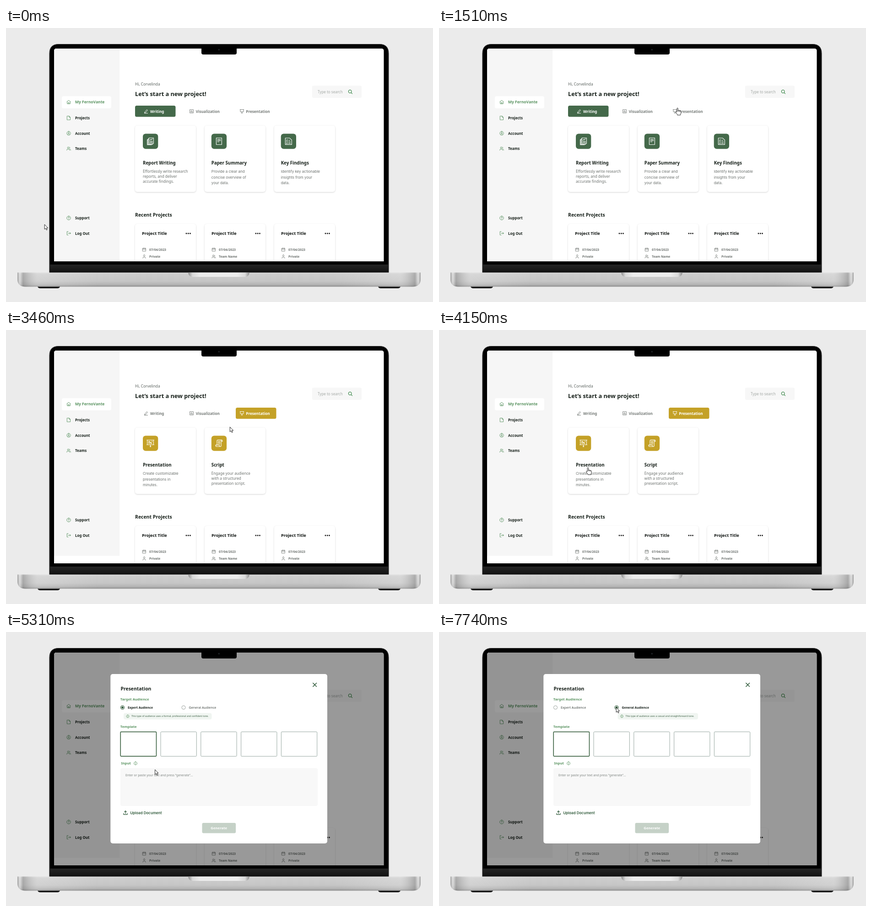
These frames come from a looping animation (933 px wide and 600 px high, 8000 ms). An HTML page:

```html
<!DOCTYPE html>
<html lang="en">
<head>
<meta charset="utf-8">
<title>Project dashboard</title>
<style>
html, body { margin: 0; width: 100%; height: 100%; overflow: hidden; background: #ebebeb; }
svg { display: block; width: 100%; height: 100%; }
text { font-family: "Noto Sans", sans-serif; white-space: pre; }
.b { font-weight: 700; }
.inter { font-family: Inter, sans-serif; }
.m { text-anchor: middle; }
.icon path { fill: none; stroke-linecap: round; stroke-linejoin: round; vector-effect: non-scaling-stroke; }
.card { fill: #fff; filter: drop-shadow(0 1px 1.6px rgba(0, 0, 0, .17)); }
</style>
</head>
<body>
<svg id="stage" viewBox="0 0 933 600" preserveAspectRatio="none"></svg>
<script>
const GREEN = '#44694a', LEAF = '#5b9462', GOLD = '#c4a127', INK = '#17201a', GREY = '#6c716e';

// Icons live in a 10 by 10 box.
const ring = 'M5 .5a4.5 4.5 0 1 0 .01 0z';
const ICONS = {
  home: 'M.8 4.6L5 .9l4.2 3.7M1.5 4v5.2h7V4M4 9V6.2h2V9',
  file: 'M1.5.6H6l2.7 2.7v6.1H1.5zM6 .6v2.7h2.7',
  account: ring + 'M5 2.5a1.6 1.6 0 1 0 .01 0zM2.2 8.3q.5-2 2.8-2t2.8 2',
  people: 'M3.7 1.4a1.8 1.8 0 1 0 .01 0zM.6 9V8q0-1.8 3.1-1.8T6.8 8v1M6.6 1.5a1.8 1.8 0 0 1 0 3.4M7.6 6.4q1.9.3 1.9 2V9',
  help: ring + 'M3.7 4q0-1.4 1.4-1.4T6.4 4Q6.3 4.8 5 5.5V6M5 7.5v.1',
  exit: 'M4 1H1v8h3M3.7 5h5.8M7.5 3l2 2-2 2',
  date: 'M1 2h8v7.4H1zM1 4.5h8M3 .7v2M7 .7v2',
  person: 'M5 .8a2 2 0 1 0 .01 0zM1.6 9.4v-.8q0-2.2 3.4-2.2t3.4 2.2v.8',
  pen: 'M2 6.4L7 .9l1.8 1.8-5 5.4-2.3.6zM1 9.7h8',
  chart: 'M.9.9h8.2v8.2H.9zM3 4.2v3M5 2.8v4.4M7 5.5v1.7',
  board: 'M.3.8h9.4M1.1.8v5.4h7.8V.8M5 6.2v2.6M3.3 9.3h3.4',
  search: 'M4.3.8a3.5 3.5 0 1 0 .01 0zM6.9 6.9l2.5 2.5',
  upload: 'M.8 6.5v2.7h8.4V6.5M5 7V.8M2.6 3.2L5 .8l2.4 2.4',
  info: ring + 'M5 4.6v2.8M5 2.7v.1',
  close: 'M.5.5l9 9M9.5.5l-9 9',
  report: 'M3 .7h6v7.2H3zM3 2H1.9v7h5.9V8M1.9 3H.9v6.6h5.5M4.2 5h3.6M4.2 6.4h3.6M4.2 3.7l1.1-1.2.9.7 1.4-1.4',
  paper: 'M1.5.7h7v8.6h-7zM3 2.7h4M3 4.2h4M3 5.7h2',
  findings: 'M.9.9h5.6l2.6 2.4v5.9H.9zM2.3 3.5l.5.5.9-1M2.3 5.5l.5.5.9-1M2.3 7.5l.5.5.9-1M5 3.8h2M5 5.7h2.5M5 7.6h2.5',
  slides: 'M.3.9h9.4M1 .9v6h8v-6M.3 6.9h9.4M5 6.9v1.8M5 8.7a.5.5 0 1 0 .01 0zM2.8 5.5v-3h1.3v3M4.1 3.7h1.2v1.8M5.3 4.5h1.4v1M6.6 2.4h1',
  script: 'M2.4 7.2V2q0-1.2 1.2-1.2h5Q9.4.8 9.4 2v.6H7.8M7.8 2.6V8q0 1.3-1.2 1.3H1.8Q.7 9.3.7 7.3h4.8v1q0 1 1.1 1M7.8 2.6V1.8q0-1 .8-1M3.8 2.7h2.6M3.8 4.2h2.6M3.8 5.7h2.6'
};

const icon = (name, cx, cy, size, color, width = .9) =>
  `<g class="icon" transform="translate(${cx - size / 2} ${cy - size / 2}) scale(${size / 10})"><path d="${ICONS[name]}" stroke="${color}" stroke-width="${width}"/></g>`;
const text = (s, x, y, size, fill, cls = '') =>
  `<text x="${x}" y="${y}" font-size="${size}" fill="${fill}" class="${cls}">${s}</text>`;
const box = (x, y, w, h, r, fill, more = '') =>
  `<rect x="${x}" y="${y}" width="${w}" height="${h}" rx="${r}" fill="${fill}" ${more}/>`;
const card = (x, y, h) => `<rect class="card" x="${x}" y="${y}" width="133" height="${h}" rx="5"/>`;
const group = (id, body) => `<g id="${id}">${body}</g>`;

const navItem = ([label, name, y]) =>
  icon(name, 137, y, 9.4, LEAF) + text(label, 151, y + 3, 7.95, INK, 'b');

function tabs(active, fill) {
  return [['Writing', 'pen', 282, 306, 315], ['Visualization', 'chart', 392, 405.7, 414.7],
    ['Presentation', 'board', 502, 515.5, 524.3]].map(([label, name, x, ix, tx], i) => {
    const on = i === active, color = on ? '#fff' : '#777c79';
    return (on ? box(x, 170, 88.5, 24.5, 3.5, fill) : '') +
      icon(name, ix, 182.4, 9, color) + text(label, tx, 185.6, 8.15, color, 'b');
  }).join('');
}

// Cards in the wide style are set in Inter with looser lines.
function toolCard(x, tx, fill, name, title, lines, wide) {
  return card(x, 213.5, 145.5) + box(tx, 231.5, 33.3, 33.3, 6, fill) +
    icon(name, tx + 16.6, 248, 17, '#fff', 1.1) + text(title, tx, 299.2, 9.7, INK, 'b') +
    lines.map((s, i) => text(s, tx, wide ? 317 + i * 12.5 : 316.6 + i * 11.3,
      wide ? 8 : 8.13, GREY, wide ? 'inter' : '')).join('');
}

function recentCard(x, i) {
  const team = i === 1;
  return card(x, 429, 110) + text('Project Title', x + 15, 453, 9.14, '#0d120f', 'b') +
    [112, 116.2, 120.4].map(d => `<circle cx="${x + d}" cy="450" r="1.4" fill="#111"/>`).join('') +
    icon('date', x + 20, 485, 8.4, GREY, .8) + text('07/04/2023', x + 31, 488, 6.85, GREY, 'b') +
    icon(team ? 'people' : 'person', x + 20, 500.3, 8.8, GREY, .8) +
    text(team ? 'Team Name' : 'Private', x + 31, 503.4, 6.8, GREY, 'b');
}

const sidebar = [['Projects', 'file', 197], ['Account', 'account', 230.5], ['Teams', 'people', 264],
  ['Support', 'help', 416], ['Log Out', 'exit', 449.5]].map(navItem).join('');

const page = box(105, 45, 721, 466, 0, '#fff') +
  `<rect id="side" x="105" y="45" width="143" height="466" fill="#f6f6f6"/>` +
  box(122, 149.3, 108, 26.7, 4, '#fff') + icon('home', 137, 162, 9.4, LEAF) +
  text('My FernoVante', 151, 165.1, 8.53, LEAF, 'b') + sidebar +
  text('Hi, Corvelinda', 282, 126, 8.34, '#5d6460') +
  text('Let’s start a new project!', 282, 148.5, 12.7, INK, 'b') +
  box(669, 126.3, 108, 26.7, 3, '#f7f7f7') + text('Type to search', 681, 143, 8.04, '#a3a8a5') +
  icon('search', 752.3, 139.7, 9.5, '#3f8a4d', 1.2) +
  group('writing', tabs(0, GREEN) +
    toolCard(282, 299, GREEN, 'report', 'Report Writing', ['Effortlessly write research', 'reports, and deliver', 'accurate findings.']) +
    toolCard(434, 448.8, GREEN, 'paper', 'Paper Summary', ['Provide a clear and', 'concise overview of', 'your data.'], true) +
    toolCard(586, 600.7, GREEN, 'findings', 'Key Findings', ['Identify key actionable', 'insights from your', 'data.'], true)) +
  group('presenting', tabs(2, GOLD) +
    toolCard(282, 299, GOLD, 'slides', 'Presentation', ['Create customizable', 'presentations in', 'minutes.'], true) +
    toolCard(434, 448.8, GOLD, 'script', 'Script', ['Engage your audience', 'with a structured', 'presentation script.'])) +
  text('Recent Projects', 282, 412.7, 10.45, INK, 'b') + [282, 434, 586].map(recentCard).join('');

function radio(x, label, on) {
  const c = (r, more) => `<circle cx="${x}" cy="165.3" r="${r}" ${more}/>`;
  return c(4, `fill="#fff" stroke="${on ? '#2f5a3a' : '#858d88'}" stroke-width="${on ? 1.1 : .8}"`) +
    (on ? c(2.4, 'fill="#2f5a3a"') : '') +
    text(label, x + 11.5, 167.9, on ? 6.75 : 7.22, on ? INK : '#444b47', on ? 'b' : '');
}
const tip = (x, w, s) => box(x, 177.5, w, 14, 4, '#f0f5f1') +
  icon('info', x + 9, 184.5, 6.6, LEAF, .8) + text(s, x + 17, 186.4, 5.22, '#3d6045');
const audience = expert => radio(254.5, 'Expert Audience', expert) + radio(388, 'General Audience', !expert) +
  (expert ? tip(257, 192.5, 'This type of audience uses a formal, professional and confident tone.')
          : tip(390.5, 175.5, 'This type of audience uses a casual and straightforward tone.'));

const templates = [0, 1, 2, 3, 4].map(i => box(250.2 + i * 87.8, 218.6, 78.3, 53.6, 1.6, '#fff',
  i ? 'stroke="#8d9f98" stroke-width=".9"' : `stroke="${GREEN}" stroke-width="1.7"`)).join('');

const modal = box(105, 45, 721, 466, 0, '#000', 'opacity=".4"') + box(228.3, 92, 473.7, 371, 5, '#fff') +
  text('Presentation', 250.6, 128.3, 10.36, INK, 'b') + icon('close', 674.6, 115.7, 8.6, '#2f5a3a', 1.5) +
  text('Target Audience', 249.8, 149.5, 7.75, LEAF, 'b') +
  group('expert', audience(true)) + group('general', audience(false)) +
  text('Template', 249.8, 209.5, 7.7, LEAF, 'b') + templates +
  text('Input', 251.4, 290, 7.75, LEAF, 'b') + icon('info', 283, 287.6, 7.6, LEAF, .9) +
  box(250, 298, 431, 83, 4, '#f8f8f8') +
  text('Enter or paste your text and press “generate”...', 261, 316, 6.72, '#7c827f') +
  icon('upload', 261, 395.6, 9.6, '#2f5a3a', 1.2) +
  `<g font-weight="600">${text('Upload Document', 271.2, 398.5, 8, '#2f5a3a', 'inter')}</g>` +
  box(428.5, 418, 73.6, 22.5, 3, '#c5d1c7') + text('Generate', 465.2, 432.2, 7.75, '#fff', 'b m');

const gradient = (id, dir, stops) => `<linearGradient id="${id}" x1="0" y1="0" x2="${dir === 'x' ? 1 : 0}" y2="${dir === 'x' ? 0 : 1}">` +
  stops.map(([o, c, a = 1]) => `<stop offset="${o}" stop-color="${c}" stop-opacity="${a}"/>`).join('') + '</linearGradient>';

const basePath = 'M25 535.5H906V550Q906 566.5 888 566.5H43Q25 566.5 25 550Z';
const laptop = `<defs>
  ${gradient('chin', 'y', [[0, '#242424'], [.5, '#1b1b1b'], [1, '#101010']])}
  ${gradient('metal', 'y', [[0, '#d9d9d9'], [.12, '#cdcdcd'], [.6, '#c6c6c6'], [.85, '#b4b4b4'], [1, '#8e8e8e']])}
  ${gradient('sheen', 'x', [[0, '#777', .6], [.006, '#fff', .35], [.014, '#777', .4], [.05, '#fff', .2],
    [.2, '#fff', 0], [.8, '#fff', 0], [.95, '#fff', .2], [.986, '#777', .4], [.994, '#fff', .35], [1, '#777', .6]])}
  ${gradient('lip', 'x', [[0, '#8c8c8c'], [.07, '#d9d9d9'], [.2, '#ececec'], [.8, '#ececec'], [.93, '#d9d9d9'], [1, '#8c8c8c']])}
  <clipPath id="screen"><path d="M105 511V50q0-5 5-5H820.5q5 0 5 5V511Z"/></clipPath></defs>
  <rect width="933" height="600" fill="#ebebeb"/>
  <path d="M95 536V56Q95 35.5 115 35.5H816Q836 35.5 836 56V536Z" fill="#000" stroke="#3d3d3d" stroke-width="1.2"/>
  <rect x="95.5" y="518" width="740" height="18" fill="url(#chin)"/>
  <path d="M69 566H118Q117 570 112 570H75Q70 570 69 566ZM813 566H862Q861 570 856 570H819Q814 570 813 566Z" fill="#161616"/>
  <path d="${basePath}" fill="url(#metal)"/><path d="${basePath}" fill="url(#sheen)"/>
  <path d="M398 535.5H532Q531 545 521 545H409Q399 545 398 535.5Z" fill="url(#lip)"/>`;

const notch = `<path d="M427 44H504V54q0 4-4 4H431q-4 0-4-4Z" fill="#000"/>
  <circle cx="465.3" cy="47.6" r="2" fill="#15171a"/><circle cx="465.3" cy="47.6" r=".8" fill="#2b3036"/>`;

const pointer = `<g id="cursor" stroke="#111" stroke-width=".9" stroke-linejoin="round" fill="#fff">
  <path id="arrow" d="M.2 .2V10.8L2.6 8.6L4.4 12.4L6.1 11.6L4.4 7.9H7.6Z"/>
  <path id="hand" d="M-1.2 8.8V1.3a1.2 1.2 0 0 1 2.4 0V5.4q1.3-.6 2 .5 1.4-.6 2.1.6 2-.4 2.3 1.4V11q0 2-1.1 3.1v1.5H-.3V14.4L-3.6 9.7q-.5-1.5.8-1.8Z M1.2 5.4v2.4M3.2 6v2M5.3 6.5v1.8"/></g>`;

document.getElementById('stage').innerHTML = laptop +
  `<g clip-path="url(#screen)">${page}${group('modal', modal)}</g>` + notch + pointer;

const LOOP = 8000;
// Each move: first step, last step, step count, waypoints [progress, x, y].
const MOVES = [
  [90, 620, 8, [[0, 84, 430], [1, 422, 183.6]]],
  [1120, 1910, 11, [[0, 422, 183.6], [6 / 11, 529, 174.4], [1, 542, 183]]],
  [3300, 4080, 11, [[0, 542, 183], [.85, 324, 303], [1, 325.4, 301.2]]],
  [5980, 6690, 10, [[0, 325.4, 301.2], [.4, 313, 262], [1, 390.6, 160]]],
  [7110, 7250, 3, [[0, 390.6, 160], [1, 387, 165]]]
];
const HAND_TIMES = [[540, 2310], [4150, 5220], [6610, 7740]];

const ease = u => u * u * (3 - 2 * u);

function along(points, u) {
  const i = Math.max(1, points.findIndex(p => p[0] >= u - 1e-6));
  const [u0, x0, y0] = points[i - 1], [u1, x1, y1] = points[i];
  const k = ease((u - u0) / (u1 - u0));
  return [x0 + (x1 - x0) * k, y0 + (y1 - y0) * k];
}

function cursorAt(t) {
  let pos = [84, 430];
  for (const [start, end, n, points] of MOVES) {
    if (t < start) break;
    const step = Math.min(n, 1 + Math.floor((t - start) / (end - start) * (n - 1) + 1e-6));
    pos = along(points, step / n);
  }
  return pos;
}

const el = id => document.getElementById(id);
const show = (id, on) => { el(id).style.display = on ? '' : 'none'; };

function draw(t) {
  const presenting = t >= 2310, general = t >= 7740;
  const hand = HAND_TIMES.some(([a, b]) => t >= a && t < b);
  show('writing', !presenting);
  show('presenting', presenting);
  el('side').setAttribute('height', presenting ? 449.5 : 466);
  show('modal', t >= 5310);
  show('expert', !general);
  show('general', general);
  show('hand', hand);
  show('arrow', !hand);
  el('cursor').setAttribute('transform', `translate(${cursorAt(t).join(' ')})`);
}

const began = performance.now();
function tick() {
  draw((performance.now() - began) % LOOP);
  requestAnimationFrame(tick);
}
tick();
</script>
</body>
</html>
```
